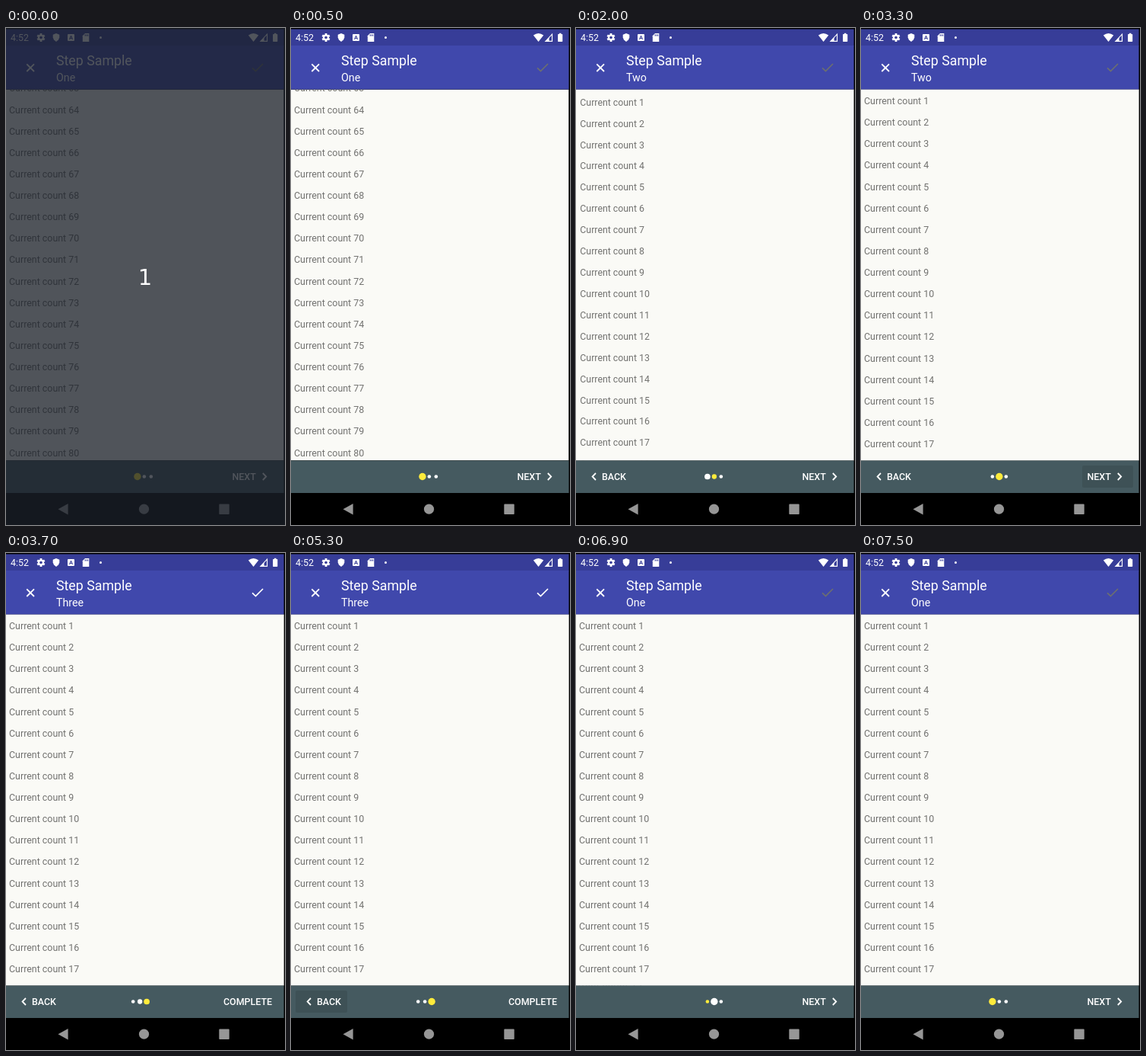
Animation, 367 px wide and 652 px high, one loop 9.6 s. Source, as an HTML page with a canvas:

```html
<!DOCTYPE html>
<html lang="en">
<head>
<meta charset="utf-8">
<title>Step Sample</title>
<style>
  html, body { margin: 0; width: 100%; height: 100%; overflow: hidden; background: #000; }
  canvas { display: block; }
</style>
</head>
<body>
<canvas id="stage" width="367" height="652"></canvas>
<script>
const ctx = document.getElementById('stage').getContext('2d');
const LOOP = 9600, TICK = 100;
const PAGE = { x: 0, y: 80.5, w: 365.5, h: 487 };
const ROW = 28.13;
const FONT = 'Roboto, sans-serif';
const TITLES = ['One', 'Two', 'Three'];
const WHITE = '#fff', YELLOW = '#ffeb3b', PAPER = '#fafaf6';
const BAR = '#4048ac', STATUS = '#373d98', FOOTER = '#455a60', PRESSED = '#3e5156';

// lead: how long the page animation has run when the step changes
const MOVES = [
  { at: 1900, from: 0, to: 1, lead: 0 },
  { at: 3500, from: 1, to: 2, lead: 50 },
  { at: 5500, from: 2, to: 1, lead: 66 },
  { at: 6900, from: 1, to: 0, lead: 0 }
];
const PAGE_MS = 200, DOT_MS = 500, PRESS_MS = 200;

const clamp = v => Math.max(0, Math.min(1, v));
const mix = (a, b, k) => a + (b - a) * k;
const cubic = (a, b, c, d, t) => {
  const u = 1 - t;
  return a * u * u * u + 3 * b * u * u * t + 3 * c * u * t * t + d * t * t * t;
};

// Fast out, extra slow in
function emphasized(p) {
  const [xs, ys] = p < 1 / 6
    ? [[0, .05, .1333, .1667], [0, 0, .06, .4]]
    : [[.1667, .2083, .25, 1], [.4, .82, 1, 1]];
  let lo = 0, hi = 1;
  for (let i = 0; i < 24; i++) {
    const mid = (lo + hi) / 2;
    if (cubic(...xs, mid) < p) lo = mid; else hi = mid;
  }
  return cubic(...ys, lo);
}

function rect(x, y, w, h, color, radius = 0) {
  ctx.fillStyle = color;
  ctx.beginPath();
  ctx.roundRect(x, y, w, h, radius);
  ctx.fill();
}

function circle(x, y, r, color) {
  ctx.fillStyle = color;
  ctx.beginPath();
  ctx.arc(x, y, r, 0, Math.PI * 2);
  ctx.fill();
}

function trace(points) {
  ctx.beginPath();
  points.forEach(([x, y]) => ctx.lineTo(x, y));
}

function shape(points, color) {
  trace(points);
  ctx.fillStyle = color;
  ctx.fill();
}

function line(points, color, width = 1.8) {
  trace(points);
  ctx.strokeStyle = color;
  ctx.lineWidth = width;
  ctx.stroke();
}

function text(str, x, y, size, color, weight = 400) {
  ctx.font = `${weight} ${size}px ${FONT}`;
  ctx.fillStyle = color;
  ctx.fillText(str, x, y);
}

function drawGear(x, y) {
  ctx.fillStyle = WHITE;
  for (let i = 0; i < 6; i++) {
    ctx.save();
    ctx.translate(x, y);
    ctx.rotate(i * Math.PI / 3);
    ctx.fillRect(-1.4, -5.5, 2.8, 3);
    ctx.restore();
  }
  circle(x, y, 4, WHITE);
  circle(x, y, 1.8, STATUS);
}

function drawStatusBar() {
  rect(0, 1.5, PAGE.w, 22, STATUS);
  text('4:52', 6, 17, 12.43, WHITE);
  drawGear(46, 12.5);
  shape([[66, 7], [70.3, 8.8], [70.3, 12.5], [69, 15.6], [66, 18], [63, 15.6], [61.7, 12.5], [61.7, 8.8]], WHITE);
  rect(81, 8, 9, 9, WHITE, 1);
  text('A', 83, 15.3, 7.5, STATUS, 700);
  shape([[104, 7], [109.3, 7], [109.3, 18], [100.8, 18], [100.8, 10.3]], WHITE);
  ctx.fillStyle = STATUS;
  for (let i = 0; i < 3; i++) ctx.fillRect(103.6 + i * 1.8, 8.4, 1, 2.2);
  circle(124.5, 12.5, 1.5, WHITE);

  ctx.beginPath();
  ctx.moveTo(325.5, 18);
  ctx.lineTo(318.8, 9.6);
  ctx.quadraticCurveTo(325.5, 4.4, 332.2, 9.6);
  ctx.fillStyle = WHITE;
  ctx.fill();
  ctx.beginPath();
  ctx.moveTo(343.5, 8.2);
  ctx.lineTo(343.5, 17.4);
  ctx.lineTo(334.8, 17.4);
  ctx.closePath();
  ctx.strokeStyle = WHITE;
  ctx.lineWidth = 1.1;
  ctx.stroke();
  shape([[339.5, 12.5], [339.5, 17.4], [334.8, 17.4]], WHITE);
  rect(351, 8, 6.2, 10, WHITE, .7);
  rect(352.8, 6.8, 2.6, 2, WHITE);
}

function drawAppBar(step) {
  rect(0, 23, PAGE.w, 57.5, BAR);
  line([[27.3, 47.3], [37, 57]], WHITE);
  line([[37, 47.3], [27.3, 57]], WHITE);
  text('Step Sample', 66, 49.4, 17.77, WHITE);
  text(TITLES[step], 66, 69.6, 14.22, WHITE);
  line([[324, 52.3], [328.4, 56.6], [338, 47]], step === 2 ? WHITE : '#6c6f70', 1.7);
}

function drawPage(scale, alpha, scrolled) {
  const cx = PAGE.x + PAGE.w / 2, cy = PAGE.y + PAGE.h / 2;
  ctx.save();
  ctx.beginPath();
  ctx.rect(PAGE.x, PAGE.y, PAGE.w, PAGE.h);
  ctx.clip();
  ctx.globalAlpha = alpha;
  ctx.translate(cx, cy);
  ctx.scale(scale, scale);
  ctx.translate(-cx, -cy);
  rect(PAGE.x, PAGE.y, PAGE.w, PAGE.h, PAPER);
  const first = scrolled ? 63 : 1;
  const top = scrolled ? 111.5 - ROW : 100;
  for (let i = 0; i < 18; i++) {
    text(`Current count ${first + i}`, 4, top + i * ROW, 12.43, '#727270');
  }
  ctx.restore();
}

function drawPages(time, move) {
  if (!move) return drawPage(1, 1, time < MOVES[0].at);
  const p = clamp((time - move.at + move.lead) / PAGE_MS);
  const k = emphasized(p);
  const leavingScrolled = move === MOVES[0];
  rect(PAGE.x, PAGE.y, PAGE.w, PAGE.h, PAPER);
  if (move.to > move.from) {
    const alpha = clamp((p - .167) / .277);
    if (alpha < 1) drawPage(mix(1, 1.15, k), 1, leavingScrolled);
    if (alpha > 0) drawPage(mix(.85, 1, k), alpha, false);
  } else {
    const alpha = 1 - clamp((p - .117) / .277);
    drawPage(mix(1.1, 1, k), 1, false);
    if (alpha > 0) drawPage(mix(1, .9, k), alpha, false);
  }
}

function drawFooter(time, step, move) {
  rect(0, 567.5, PAGE.w, 42.5, FOOTER);
  const next = MOVES.find(m => time >= m.at - PRESS_MS && time < m.at);
  if (next) rect(...(next.to > next.from ? [291, 574, 67, 29] : [6, 574, 68, 29]), PRESSED, 2);

  if (step > 0) {
    line([[26, 584], [21.6, 588.5], [26, 593]], WHITE);
    text('BACK', 34, 593, 12.43, WHITE, 500);
  }
  if (step < 2) {
    text('NEXT', 297.5, 593, 12.43, WHITE, 500);
    line([[337.8, 584], [342.2, 588.5], [337.8, 593]], WHITE);
  } else {
    text('COMPLETE', 286, 593, 12.43, WHITE, 500);
  }

  const p = move ? clamp((time - move.at) / DOT_MS) : 1;
  const grown = 1 - (1 - p) ** 2;
  const left = step === 2 ? 167.2 : 172.9;
  for (let i = 0; i < 3; i++) {
    let size = i === step ? grown : 0;
    if (move && i === move.from) size = 1 - grown;
    circle(left + i * 8.95, 588.5, mix(2.3, 4.7, size), i === step ? YELLOW : WHITE);
  }
}

function drawNavigation() {
  const gray = '#969696';
  shape([[68.5, 631.3], [81.6, 624], [81.6, 638.6]], gray);
  circle(181.5, 631.2, 6.6, gray);
  rect(280.3, 624.6, 13.4, 13.4, gray, .8);
}

function drawCountdown() {
  rect(0, 0, 367, 652, 'rgba(27, 32, 41, .76)');
  ctx.font = '29px "DejaVu Sans", sans-serif';
  ctx.textAlign = 'center';
  ctx.fillStyle = WHITE;
  ctx.fillText('1', 183, 337);
  ctx.textAlign = 'left';
}

function draw(now) {
  const time = Math.floor((now % LOOP) / TICK) * TICK;
  const move = MOVES.filter(m => time >= m.at).pop();
  const step = move ? move.to : 0;
  rect(0, 0, 367, 652, '#000');
  drawPages(time, move);
  drawStatusBar();
  drawAppBar(step);
  drawFooter(time, step, move);
  drawNavigation();
  if (time < 500) drawCountdown();
}

const start = performance.now();
function frame() {
  draw(performance.now() - start);
  requestAnimationFrame(frame);
}
frame();
</script>
</body>
</html>
```
